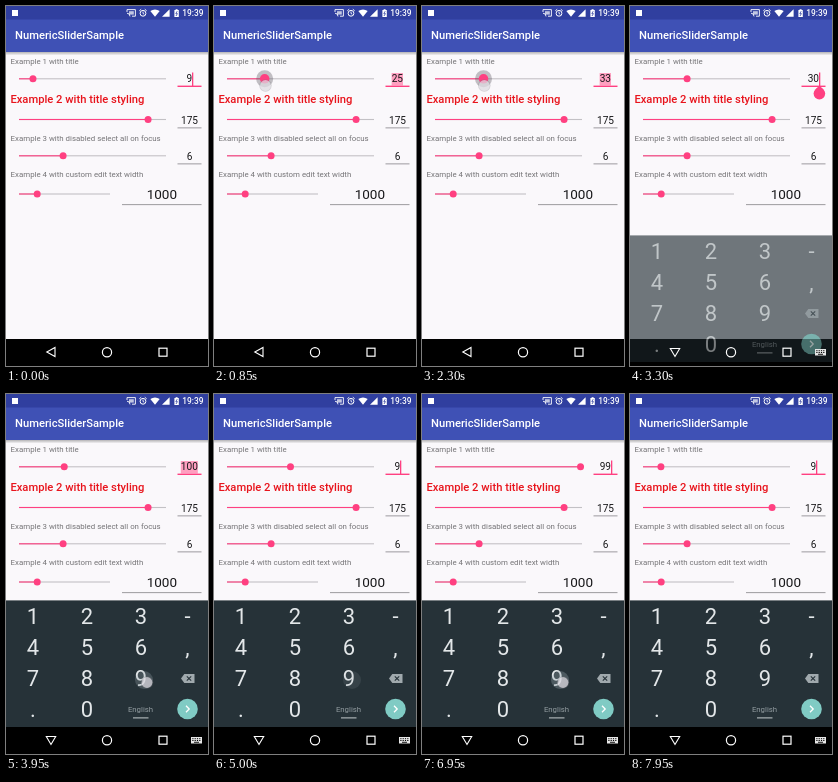
An HTML page with a canvas that plays this animation: 202 px wide and 360 px high, repeating every 8000 ms.

```html
<!DOCTYPE html>
<html lang="en">
<head>
<meta charset="utf-8">
<title>Seek bars</title>
<style>
html, body { margin: 0; width: 100%; height: 100%; overflow: hidden; background: #faf8fb; }
canvas { display: block; width: 202px; height: 360px; }
</style>
</head>
<body>
<canvas id="stage"></canvas>
<script>
const W = 202, H = 360, LOOP = 8000, STEP = 50;
const PINK = '#ff4081', DARK = '#18181a', GREY = '#757477';
const canvas = document.getElementById('stage');
const ctx = canvas.getContext('2d');
const dpr = window.devicePixelRatio || 1;
canvas.width = W * dpr;
canvas.height = H * dpr;

// Drag positions of the first slider: time, value
const drag = [[0, 9.5], [100, 9], [550, 9], [1400, 69], [1700, 84], [2300, 33], [2600, 28], [2900, 30]];
// Typed numbers: key press, start of the thumb move, old and new value
const typed = [
  { tap: 3900, at: 3930, from: 30, to: 100 },
  { tap: 4800, at: 4826, from: 100, to: 9 },
  { tap: 5850, at: 5880, from: 9, to: 99 },
  { tap: 6950, at: 6980, from: 99, to: 100 },
  { tap: 7600, at: 7686, from: 100, to: 9 }
];

const clamp = x => Math.max(0, Math.min(1, x));
const mix = (a, b, p) => a + (b - a) * p;
const ease = p => 0.5 - Math.cos(Math.PI * clamp(p)) / 2;
const within = (t, a, b) => t >= a && t < b;

function rect(x, y, w, h, color) {
  ctx.fillStyle = color;
  ctx.fillRect(x, y, w, h);
}

function disc(x, y, r, color) {
  ctx.fillStyle = color;
  ctx.beginPath();
  ctx.arc(x, y, r, 0, Math.PI * 2);
  ctx.fill();
}

function ring(x, y, r, color, width) {
  ctx.strokeStyle = color;
  ctx.lineWidth = width;
  ctx.beginPath();
  ctx.arc(x, y, r, 0, Math.PI * 2);
  ctx.stroke();
}

function poly(points, color, stroke) {
  ctx.beginPath();
  points.forEach(([x, y], i) => i ? ctx.lineTo(x, y) : ctx.moveTo(x, y));
  ctx.closePath();
  if (stroke) {
    ctx.strokeStyle = color;
    ctx.lineWidth = stroke;
    ctx.stroke();
  } else {
    ctx.fillStyle = color;
    ctx.fill();
  }
}

function lines(color, width, ...paths) {
  ctx.strokeStyle = color;
  ctx.lineWidth = width;
  ctx.beginPath();
  for (const path of paths) path.forEach(([x, y], i) => i ? ctx.lineTo(x, y) : ctx.moveTo(x, y));
  ctx.stroke();
}

function label(str, x, y, size, color, align = 'left', weight = 400) {
  ctx.font = `${weight} ${size}px Roboto, sans-serif`;
  ctx.textAlign = align;
  ctx.fillStyle = color;
  ctx.fillText(str, x, y);
}

function dragValue(t) {
  const i = drag.findIndex(k => k[0] > t);
  if (i < 0) return 30;
  const [t0, a] = drag[i - 1], [t1, b] = drag[i];
  return mix(a, b, ease((t - t0) / (t1 - t0)));
}

function stateAt(t) {
  const key = typed.filter(k => t >= k.at).pop();
  if (!key) {
    const v = dragValue(t);
    return { pos: v, text: String(Math.floor(v + 0.01)), selected: within(t, 550, 3150), since: t < 3150 ? -150 : 3150 };
  }
  return {
    pos: mix(key.from, key.to, ease((t - key.at) / 300)),
    text: String(key.to),
    selected: key.to === 100,
    since: key.tap + 50
  };
}

function statusIcons() {
  rect(6, 4, 6, 6, '#fff');
  // cast
  lines('#fff', 0.9, [[121, 6], [121, 3.6], [129.4, 3.6], [129.4, 10.2], [126, 10.2]],
    [[121, 7.2], [123.2, 8], [124, 10.4]]);
  rect(123, 5.2, 4.8, 3.4, 'rgba(255,255,255,.7)');
  // alarm
  ring(137, 7.3, 2.9, '#fff', 1);
  lines('#fff', 0.9, [[137, 5.6], [137, 7.5], [138.3, 8.2]],
    [[133.3, 4.8], [135.2, 3.2]], [[138.8, 3.2], [140.7, 4.8]]);
  // wifi
  ctx.fillStyle = '#fff';
  ctx.beginPath();
  ctx.moveTo(149, 10.8);
  ctx.lineTo(144.3, 5);
  ctx.quadraticCurveTo(149, 1.8, 153.7, 5);
  ctx.fill();
  poly([[156, 10.8], [163.6, 10.8], [163.6, 3.2]], '#fff');
  // battery
  rect(168.4, 4, 4.4, 7, '#fff');
  rect(169.6, 3.2, 2, 1, '#fff');
  lines('#303f9f', 0.8, [[171.2, 5.2], [169.8, 7.6], [171.4, 7.6], [170, 10]]);
}

function header() {
  const shade = ctx.createLinearGradient(0, 46, 0, 49.5);
  shade.addColorStop(0, 'rgba(0,0,0,.28)');
  shade.addColorStop(1, 'rgba(0,0,0,0)');
  rect(0, 46, W, 4, shade);
  rect(0, 0, W, 46, '#3f51b5');
  rect(0, 0, W, 13.5, '#303f9f');
  label('NumericSliderSample', 9, 33.4, 11.2, '#fff', 'left', 500);
  label('19:39', 197.6, 10.2, 8.4, '#fff', 'right', 500);
  statusIcons();
}

function slider(y, end, pos, press = 0) {
  const x = mix(13, end, pos / 100);
  rect(13, y - 0.55, end - 13, 1.1, '#c3c1c5');
  rect(13, y - 0.55, x - 13, 1.1, PINK);
  if (press) disc(x, y, 4 + 4.5 * press, `rgba(100,95,105,${0.38 * press})`);
  disc(x, y, 3.5 + 1.3 * press, PINK);
}

function field(str, cx, base, size, x0, y, w) {
  label(str, cx, base, size, DARK, 'center');
  rect(x0, y, w, 0.8, '#858387');
}

function content(t) {
  const s = stateAt(t);
  const press = clamp((t - 500) / 150) * clamp((3050 - t) / 150);
  label('Example 1 with title', 4.6, 58.4, 7.86, GREY);
  label('Example 2 with title styling', 4.4, 97.2, 11.2, '#e8141c', 'left', 500);
  label('Example 3 with disabled select all on focus', 4.6, 134.6, 7.86, GREY);
  label('Example 4 with custom edit text width', 4.6, 170.8, 7.86, GREY);
  slider(72.8, 160, s.pos, press);
  slider(113.5, 160, 87.8);
  slider(149.8, 160, 30);
  slider(188, 104, 20);
  field('175', 183.5, 117.5, 10.1, 171.5, 121.5, 24);
  field('6', 183.5, 153.6, 10.1, 171.5, 157.5, 24);
  field('1000', 155.8, 193, 13.5, 116, 198.3, 79.5);

  const half = s.text.length * 2.84;
  if (s.selected) rect(183.3 - half, 67, half * 2, 12.5, '#ff9fc0');
  label(s.text, 183.3, 76.4, 10.1, DARK, 'center');
  rect(171.5, 79.6, 24, 1.4, PINK);
  const lit = Math.floor((t - s.since) / 500) % 2 === 0;
  if (!s.selected && lit) rect(Math.round(183.3 + half), 66.5, 1.3, 13.5, PINK);
  if (within(t, 3250, 3900)) {
    disc(189.4, 87.6, 5.8, PINK);
    poly([[189.4, 79.5], [193.5, 83.6], [185.3, 83.6]], PINK);
  }
  return mix(13, 160, s.pos / 100);
}

// The panel and its keys fade in apart: the keys are nearly opaque early on
function keyboard(t) {
  const p = ease((t - 3200) / 200);
  if (!p) return;
  ctx.save();
  ctx.translate(0, 46 * (1 - p));
  ctx.globalAlpha = 0.3 + 0.7 * p;
  rect(0, 206.4, W, 126.6, '#263238');
  ctx.globalAlpha = Math.sqrt(p);
  const ink = '#e3e7e9';
  ['123-', '456,', '789', '.0'].forEach((row, r) => [...row].forEach((ch, c) =>
    label(ch, [27, 81, 135, 181.5][c], 230 + r * 31, 22, ink, 'center')));
  label('English', 134.5, 318, 7.8, '#929ca0', 'center');
  rect(127, 323.4, 15.5, 1, '#c4cacc');
  poly([[175, 284.5], [178.3, 280], [188.5, 280], [188.5, 289], [178.3, 289]], '#a0a9ad');
  lines('#263238', 1.1, [[180.8, 282.3], [185.2, 286.7]], [[185.2, 282.3], [180.8, 286.7]]);
  disc(181.5, 315, 10.3, '#80cbc4');
  lines('#fff', 1.3, [[180, 311.8], [183.2, 315], [180, 318.2]]);
  ctx.restore();
}

function navBar(t) {
  const open = t >= 3200;
  if (t < 3400) rect(0, 333, W, 27, open ? 'rgba(0,0,0,.28)' : '#000');
  poly(open ? [[40.3, 342.5], [49.7, 342.5], [45, 350.5]] : [[49, 341.5], [49, 350.5], [40.8, 346]], '#fff', 1.1);
  ring(101, 346.2, 4.6, '#fff', 1.2);
  ctx.strokeRect(153, 342.2, 8, 8);
  if (!open) return;
  rect(185, 343, 11, 6.5, '#e6e6e6');
  for (let i = 0; i < 8; i++) rect(186.3 + (i % 4) * 2.3, 344.2 + Math.floor(i / 4) * 1.8, 1.2, 1, '#000');
  rect(188, 347.8, 5, 0.9, '#000');
}

function touches(t, thumbX) {
  const dot = (x, y) => {
    disc(x, y, 6.2, 'rgba(120,120,125,.3)');
    disc(x, y, 5.4, 'rgba(240,238,243,.62)');
  };
  if (within(t, 550, 2900)) dot(thumbX + 0.8, 79.5);
  if (within(t, 3100, 3200)) dot(186, 76);
  for (const { tap } of typed) {
    const age = t - tap;
    if (!within(age, 0, 350)) continue;
    disc(138, 286, 9, `rgba(150,165,172,${0.34 * (1 - age / 350)})`);
    if (age < 100) dot(141, 288.5);
  }
}

function draw(now) {
  const t = Math.floor((now % LOOP) / STEP) * STEP;
  ctx.setTransform(dpr, 0, 0, dpr, 0, 0);
  rect(0, 0, W, H, '#faf8fb');
  header();
  const thumbX = content(t);
  rect(0, 333, W, 27, '#000');
  keyboard(t);
  navBar(t);
  touches(t, thumbX);
}

let start;
function tick(now) {
  start ??= now;
  draw(now - start);
  requestAnimationFrame(tick);
}
draw(0);
requestAnimationFrame(tick);
</script>
</body>
</html>
```
